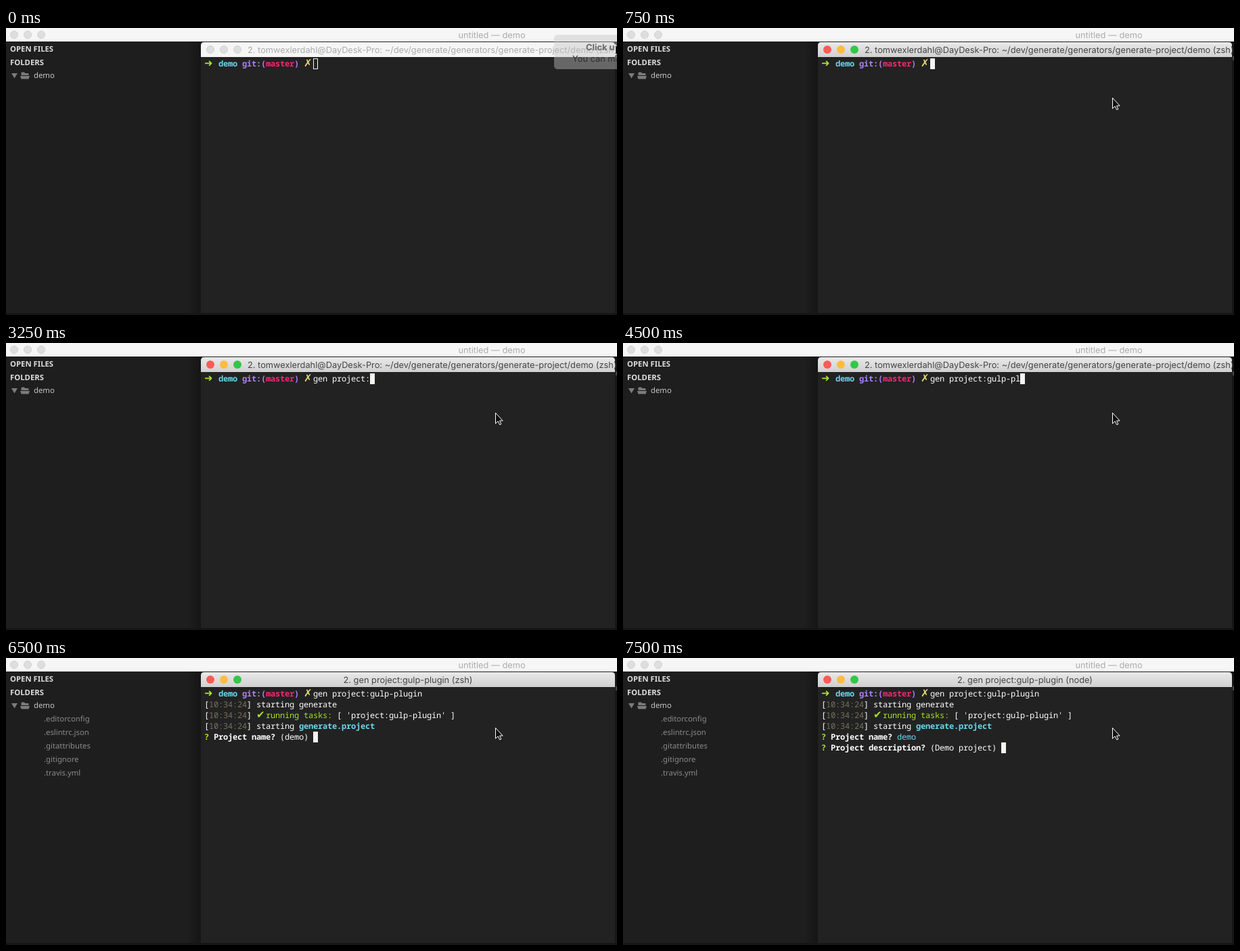
An HTML page that plays this animation: 903x425 px, repeating every 8 s.

```html
<!DOCTYPE html>
<html lang="en">
<head>
<meta charset="utf-8">
<title>Terminal demo</title>
<style>
  html, body { margin: 0; width: 100%; height: 100%; overflow: hidden; background: #1e1e1e; }
  svg { display: block; width: 903px; height: 425px; }
  text { white-space: pre; text-rendering: geometricPrecision; }
  .title { font: 12.8px Inter, sans-serif; fill: #444; }
  .title.off { fill: #ababab; }
  .side { font: 11.3px "Noto Sans", sans-serif; fill: #8a8a8a; }
  .side .head { font-weight: 700; fill: #dcdcdc; }
  .side .open { fill: #c4c4c4; }
  .term { font: 500 12px "Noto Sans Mono", monospace; letter-spacing: -.2px; fill: #fff; }
  .bold { font-weight: 700; }
  .sign { font: bold 15px "DejaVu Sans", sans-serif; letter-spacing: 0; }
  .green { fill: #a6e22e; }
  .cyan { fill: #66d9ef; }
  .purple { fill: #ae81ff; }
  .pink { fill: #f92672; }
  .yellow { fill: #e6db74; }
  .dim { fill: #75715e; }
  .notice { font: 12.8px Inter, sans-serif; fill: #303030; }
  .notice .bold { fill: #686868; }
</style>
</head>
<body>
<svg viewBox="0 0 903 425" xmlns="http://www.w3.org/2000/svg">
  <defs>
    <linearGradient id="silver" x2="0" y2="1">
      <stop stop-color="#e9e9e9"/><stop offset="1" stop-color="#d0d0d0"/>
    </linearGradient>
    <linearGradient id="shade">
      <stop stop-color="#000" stop-opacity="0"/><stop offset="1" stop-color="#000" stop-opacity=".3"/>
    </linearGradient>
    <path id="bar" d="M288 43V26q0-5 5-5h602q5 0 5 5v17z"/>
  </defs>

  <!-- editor -->
  <rect width="903" height="425" fill="#1e1e1e"/>
  <rect width="903" height="20" fill="#f6f6f6"/>
  <g fill="#dedede" stroke="#d2d2d2">
    <circle cx="12" cy="10" r="5.5"/><circle cx="32" cy="10" r="5.5"/><circle cx="52" cy="10" r="5.5"/>
  </g>
  <text class="title off" x="718" y="15" text-anchor="middle">untitled — demo</text>
  <g class="side">
    <text class="head" x="6" y="35">OPEN FILES</text>
    <text class="head" x="6" y="55">FOLDERS</text>
    <path d="M8 67h9l-4.500 7.500z" fill="#7c7c7c"/>
    <path d="M22.500 70v-3.500q0-1 1-1h3.500l1.500 1.500h4q1 0 1 1v2zM21 71h14l-1.500 4.500h-11z" fill="#7c7c7c"/>
    <text class="open" x="41" y="74">demo</text>
    <g id="files" data-from="6500"></g>
  </g>

  <!-- terminal window -->
  <rect x="268" y="20" width="20" height="405" fill="url(#shade)"/>
  <rect x="900" y="20" width="3" height="405" fill="#161616"/>
  <rect x="901" y="42" width="2" height="6" fill="#484848"/>
  <path d="M288 425V26q0-5 5-5h602q5 0 5 5v399z" fill="#222"/>
  <rect y="422" width="903" height="3" fill="#171515"/>
  <g data-to="750">
    <use href="#bar" fill="#f6f6f6"/>
    <g fill="#dedede" stroke="#d2d2d2">
      <circle cx="302" cy="32" r="5.500"/><circle cx="322" cy="32" r="5.500"/><circle cx="342" cy="32" r="5.500"/>
    </g>
  </g>
  <g data-from="750">
    <use href="#bar" fill="url(#silver)"/>
    <circle cx="302" cy="32" r="6" fill="#fc5b57"/>
    <circle cx="322" cy="32" r="6" fill="#fdbc40"/>
    <circle cx="342" cy="32" r="6" fill="#33c748"/>
  </g>
  <text id="path" class="title" x="357" y="37" data-to="5500">2. tomwexlerdahl@DayDesk-Pro: ~/dev/generate/generators/generate-project/demo (zsh)</text>
  <text class="title" x="594" y="37" text-anchor="middle" data-from="5500" data-to="6750">2. gen project:gulp-plugin (zsh)</text>
  <text class="title" x="594" y="37" text-anchor="middle" data-from="6750">2. gen project:gulp-plugin (node)</text>

  <g id="term" class="term"></g>
  <rect id="caret" width="7" height="16" fill="#f4f4f0"/>
  <rect x="454.5" y="45.500" width="6" height="15" fill="none" stroke="#f4f4f0" data-to="750"/>

  <g class="notice" data-to="250">
    <rect x="810" y="10" width="110" height="51" rx="5" fill="#c3c3c3" fill-opacity=".43"/>
    <text class="bold" x="857" y="33">Click un</text>
    <text x="837" y="50">You can move</text>
  </g>
  <path id="pointer" d="M.5.5v15.800l3.600-3.400 2.600 5.100 2.200-.9-2.300-5h4.600z" fill="#111" stroke="#fff"/>
</svg>
<script>
  const LOOP = 8000, LEFT = 293, TOP = 45, CELL = 7, ROW = 16;
  const COMMAND = "gen project:gulp-plugin", PROMPT_END = 23;
  const term = document.getElementById("term");
  const caret = document.getElementById("caret");
  const pointer = document.getElementById("pointer");
  const path = document.getElementById("path");

  function add(parent, tag, attrs, content = "") {
    const el = document.createElementNS("http://www.w3.org/2000/svg", tag);
    for (const key in attrs) el.setAttribute(key, attrs[key]);
    el.textContent = content;
    return parent.appendChild(el);
  }

  // Each run is [column, text, classes].
  function line(row, from, to, ...runs) {
    const group = add(term, "g", { "data-from": from, "data-to": to });
    for (const [col, content, style = ""] of runs)
      add(group, "text", { x: LEFT + col * CELL, y: TOP + 12 + row * ROW, class: style }, content);
    return group;
  }
  const stamp = [[0, "["], [1, "10:34:24", "dim"], [9, "]"]];
  const question = content => [[0, "?", "green bold"], [2, content, "bold"]];

  line(0, 0, LOOP,
    [0, "➜", "sign green"], [3, "demo", "cyan bold"], [8, "git:(", "purple bold"],
    [13, "master", "pink bold"], [19, ")", "purple bold"], [21, "✗", "sign yellow"]);
  const typed = line(0, 0, LOOP, [PROMPT_END, ""]).firstChild;
  line(1, 5500, LOOP, ...stamp, [11, "starting generate"]);
  line(2, 5750, LOOP, ...stamp, [11, "✔", "sign green"], [13, "running tasks:", "green"],
    [28, "[ 'project:gulp-plugin' ]"]);
  line(3, 6000, LOOP, ...stamp, [11, "starting"], [20, "generate.project", "cyan bold"]);
  line(4, 6500, LOOP, ...question("Project name?"));
  line(4, 6500, 7250, [16, "(demo)"]);
  line(4, 7250, LOOP, [16, "demo", "cyan"]);
  line(5, 7500, LOOP, ...question("Project description?"), [23, "(Demo project)"]);

  [".editorconfig", ".eslintrc.json", ".gitattributes", ".gitignore", ".travis.yml"]
    .forEach((name, i) => add(document.getElementById("files"), "text", { x: 56, y: 94 + i * 20 }, name));

  // [time, characters typed]
  const typing = [[0, 0], [1500, 2], [1750, 4], [2000, 5], [2250, 8], [2500, 9], [2750, 10],
    [3000, 11], [3250, 12], [3500, 14], [3750, 16], [4000, 17], [4500, 19], [4750, 21], [5000, 23]];
  // [time, row, column] once the command runs
  const carets = [[5500, 2, 0], [5750, 3, 0], [6000, 4, 0], [6500, 4, 23], [7250, 5, 0], [7500, 5, 38]];
  const pointers = [[0, 900, 24], [250, 900, 43], [500, 723, 103]];

  const at = (steps, t) => steps.findLast(step => step[0] <= t);
  const timed = [...document.querySelectorAll("[data-from], [data-to]")].map(el => ({
    el, from: +(el.dataset.from || 0), to: +(el.dataset.to || LOOP)
  }));

  function draw() {
    const t = performance.now() % LOOP;
    for (const { el, from, to } of timed)
      el.style.display = t >= from && t < to ? "" : "none";

    const count = at(typing, t)[1];
    typed.textContent = COMMAND.slice(0, count);
    const [, row, col] = at(carets, t) || [0, 0, PROMPT_END + count];
    caret.setAttribute("x", LEFT + col * CELL);
    caret.setAttribute("y", TOP + row * ROW);
    caret.style.display = t < 750 ? "none" : "";

    const [, x, y] = at(pointers, t);
    pointer.setAttribute("transform", `translate(${x} ${y})`);
    path.classList.toggle("off", t < 750);
    requestAnimationFrame(draw);
  }
  draw();
</script>
</body>
</html>
```
